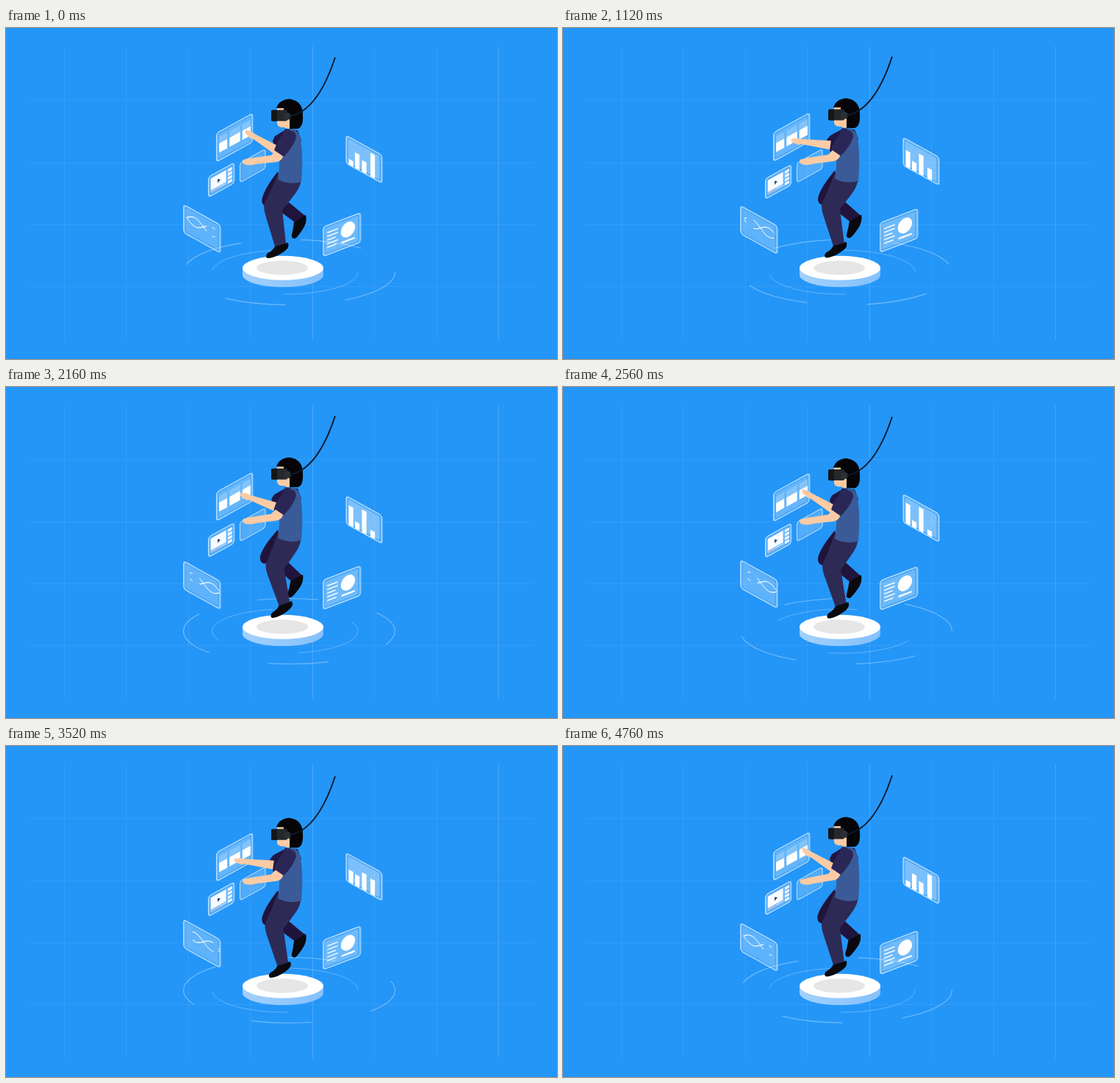
An HTML page for the animation above (4800 ms loop, 750 px wide and 450 px high).

```html
<!DOCTYPE html>
<html lang="en">
<head>
<meta charset="utf-8">
<title>Virtual reality</title>
<style>
  html, body { margin: 0; width: 100%; height: 100%; overflow: hidden; background: #2496f8; }
  svg { display: block; width: 750px; height: 450px; }
  .glass { fill: #fff; fill-opacity: .17; stroke: #fff; stroke-opacity: .62; stroke-width: 1.2; }
  .edge { fill: none; stroke: #fff; stroke-opacity: .35; stroke-width: 1; }
  .pale { fill: #fff; }
  .white { fill: #fff; }
  .skin { fill: #fccba4; }
  .line { fill: none; stroke: #fff; }
</style>
</head>
<body>
<svg viewBox="0 0 750 450" xmlns="http://www.w3.org/2000/svg">
  <defs>
    <linearGradient id="rim"><stop stop-color="#a2d1fc"/><stop offset="1" stop-color="#84c0fb"/></linearGradient>
    <clipPath id="tableClip"><rect x="3.5" y="4" width="43" height="31"/></clipPath>
  </defs>
  <rect width="750" height="450" fill="#2496f8"/>
  <g id="grid" stroke="#fff"></g>

  <ellipse id="outer" class="line" cx="385.5" cy="332" rx="144" ry="44.5" stroke-opacity=".34" stroke-width="1.2" stroke-dasharray="82"/>
  <ellipse id="inner" class="line" cx="379.7" cy="332" rx="99.2" ry="30" stroke-opacity=".28" stroke-dasharray="110"/>

  <path d="M322 326V335.8A55 16.5 0 0 0 432 335.8V326Z" fill="url(#rim)"/>
  <ellipse class="white" cx="377" cy="326.3" rx="55" ry="16.5"/>
  <ellipse cx="376" cy="326" rx="35" ry="9.7" fill="#e6e6e6"/>

  <g id="table"><g clip-path="url(#tableClip)"><g id="strip"></g></g></g>
  <g id="video">
    <rect class="white" x="3.2" y="4" width="20.8" height="16" opacity=".95"/>
    <path d="M12.5 9.5L16.5 12.5L12.5 15Z" fill="#2a4a80"/>
    <path class="line" d="M3.2 21.8H24" stroke-opacity=".7"/>
    <path d="M3.2 21.8H15" stroke="#e9a3b5"/>
    <path class="line" d="M26.5 6H32.5M26.5 11.3H32.5M26.5 16.6H32.5M26.5 21.9H32.5" stroke-width="3.4" stroke-opacity=".9"/>
  </g>
  <g id="blank"></g>
  <g id="waves"><g id="curves" class="line" stroke-width="1.2" stroke-opacity=".85" stroke-dasharray="32 8 4 10"></g></g>
  <g id="chart"><g id="bars" class="white"></g></g>
  <g id="profile">
    <path class="line" d="M5.5 10H20M5.5 15H20M5.5 20H17M5.5 25H20M5.5 30H18" stroke-width="1.7" stroke-opacity=".9"/>
    <ellipse class="white" cx="33.8" cy="16.3" rx="9.7" ry="10.2"/>
    <path class="line" d="M25 31H43" stroke-width="2.4"/>
  </g>

  <g id="person">
    <g id="farLeg">
      <path d="M370 195Q352 218 348.5 232Q347 241 355 243L378 226Z" fill="#20143c"/>
      <path d="M376 244L385 237L408 256L397 267L374 250Z" fill="#20143c"/>
      <path d="M392 264L408 254Q410 262 406 270Q399 282 394 286Q388 287 389 281Q391 274 392 264Z" fill="#0a0a0e"/>
    </g>
    <g id="nearLeg">
      <path d="M367 294L384 292Q387 299 377 305Q365 313 356 313Q352 311 356 306Q365 302 367 294Z" fill="#0a0a0e"/>
      <path d="M370 198Q361 221 352 238Q350 244 353 254L366 297L381 293L376 247Q383 239 390 230Q402 216 402 203Z" fill="#2d2a56"/>
    </g>
    <path id="farSleeve" fill="#211744"/>
    <path d="M380 137L397 139L402 152L396 165L372 165Q372 150 380 137Z" fill="#2a2757"/>
    <path d="M386 137Q397 137 401 149Q405 177 402 209Q386 214 370 206Q373 188 372 170Q380 150 390 144Z" fill="#3a5b97"/>
    <path id="farArm" class="skin"/>
    <path id="nearArm" class="skin" d="M367 167L378 171Q377 180 369 182L341 185Q330 188 324 185Q320 181 323 179L333 177L361 173Z"/>
    <path d="M381 141Q395 137 395 149Q391 162 378 175L365 166Q370 150 381 141Z" fill="#2a2757"/>

    <path class="skin" d="M369 109H388V136Q381 138 379 135Q370 136 369 130Z"/>
    <path d="M368 109Q372 97 386 96.5Q404 99 404 118Q405 135 397 137H386V124L378 115V109Z" fill="#050507"/>
    <rect x="361" y="111.5" width="22" height="15" rx="2" fill="#25282b"/>
    <path d="M361 112.5Q366 111 369 112V126.5Q364 127 361 126Z" fill="#141618"/>
    <circle cx="383" cy="120" r="5" fill="#2c3034"/>
    <path d="M386 120Q424 113 448 40" fill="none" stroke="#0e1a2c" stroke-width="1.9"/>
  </g>
</svg>
<script>
const $ = id => document.getElementById(id);
const LOOP = 4800, SPAN = 4760, TAU = Math.PI * 2;
const mix = (a, b, k) => a + (b - a) * k;

function add(parent, tag, attrs, first) {
  const el = document.createElementNS('http://www.w3.org/2000/svg', tag);
  for (const name in attrs) el.setAttribute(name, attrs[name]);
  parent.insertBefore(el, first ? parent.firstChild : null);
  return el;
}
const put = (id, value, name = 'transform') => $(id).setAttribute(name, value);

function smooth(a, b, x) {
  const k = Math.min(1, Math.max(0, (x - a) / (b - a)));
  return k * k * (3 - 2 * k);
}

// Drift values at a few moments, eased from one to the next.
const moments = [0, 720, 1520, 2160, 3000, 4160, SPAN];
function drift(values, t) {
  let i = 0;
  while (i < 5 && t >= moments[i + 1]) i++;
  return mix(values[i], values[i + 1], smooth(moments[i], moments[i + 1], t));
}

// Skewed glass panels; dx, dy place the second edge, tint fills the screen.
const panels = {
  table:   { x: 286.5, y: 143, w: 48.5, h: 39, skew: -.55, dx: 1, dy: 0, tint: .15, bob: [0, -2, .5, 0, 2, 2, 1] },
  video:   { x: 275.5, y: 202.5, w: 34.5, h: 27.5, skew: -.55, dx: 1, dy: 0, tint: .22, bob: [0, 3.5, 1.5, 1.5, 2.5, .5, 0] },
  blank:   { x: 318.5, y: 183.5, w: 34.5, h: 26.5, skew: -.55, dx: 0, dy: 0, tint: .05, bob: [0, 0, 0, 0, 0, 0, 0] },
  waves:   { x: 241.7, y: 240, w: 49.5, h: 38, skew: .55, dx: 1, dy: .6, tint: .12, bob: [0, 3.5, -.5, -3.5, -6.5, -1, .5] },
  chart:   { x: 463, y: 146, w: 48.3, h: 38, skew: .55, dx: 1, dy: .4, tint: .28, bob: [0, 4, 1.5, 2, -3, 2.5, 4] },
  profile: { x: 431.7, y: 270.5, w: 50.3, h: 40, skew: -.38, dx: 1.3, dy: 0, tint: .2, bob: [0, -6, -5, -8, -6, -7, 0] }
};
for (const id in panels) {
  const p = panels[id], g = $(id), size = { width: p.w, height: p.h, rx: 3.5 };
  add(g, 'rect', { x: 2.8, y: 2.8, width: p.w - 5.6, height: p.h - 5.6, rx: 2, class: 'pale', opacity: p.tint }, true);
  add(g, 'rect', { ...size, class: 'glass' }, true);
  if (p.dx) add(g, 'rect', { ...size, x: p.dx, y: p.dy, class: 'edge' }, true);
}

const pixel = v => Math.floor(v) + .5;
for (let i = 0; i < 8; i++)
  add($('grid'), 'path', { d: `M${pixel(79.5 + i * 84.45)} 25V424`, opacity: i == 4 || i == 7 ? .16 : .07 });
for (let i = 0; i < 4; i++)
  add($('grid'), 'path', { d: `M32 ${pixel(98.7 + i * 84.4)}H718`, opacity: .07 });

for (let i = 0; i < 4; i++) {
  const x = i * 17.5;
  add($('strip'), 'rect', { x, y: 7, width: 14.5, height: 9, class: 'pale', opacity: .2 });
  add($('strip'), 'rect', { x, y: 16, width: 14.5, height: 12.5, class: 'white' });
}

// Two mirrored waves that cross every 23 units.
for (const sign of [-1, 1]) {
  let d = '';
  for (let x = 4; x <= 49; x++)
    d += `${d ? 'L' : 'M'}${x} ${(15.5 + sign * 6 * Math.sin(Math.PI * (x - 4) / 23)).toFixed(2)}`;
  add($('curves'), 'path', { d });
}

const barX = [3.5, 12, 21.5, 33], low = [7.5, 21, 15.5, 32], high = [30.5, 7, 34, 4.5], base = 37.3;
const bars = barX.map(x => add($('bars'), 'rect', { x, width: 6.2 }));

// Forearm with a tapered wrist and a pointed hand.
function forearm(ex, ey, hx, hy) {
  const len = Math.hypot(hx - ex, hy - ey), ux = (hx - ex) / len, uy = (hy - ey) / len;
  const at = (along, side) =>
    `${(ex + ux * along - uy * side).toFixed(2)} ${(ey + uy * along + ux * side).toFixed(2)}`;
  return `M${at(-3, 6)}L${at(len - 14, 3.2)}Q${at(len - 5, 4)} ${at(len, 1.5)}` +
    `Q${at(len + 2, -1)} ${at(len - 2, -3)}L${at(len - 10, -5)}L${at(len - 15, -3.8)}L${at(-3, -6)}Z`;
}

function draw(t) {
  const u = t / SPAN;
  put('outer', 492 * u, 'stroke-dashoffset');
  put('inner', -440 * u, 'stroke-dashoffset');

  for (const id in panels) {
    const p = panels[id];
    put(id, `matrix(1 ${p.skew} 0 1 ${p.x} ${(p.y + drift(p.bob, t)).toFixed(2)})`);
  }

  const pulse = (1 - Math.cos(TAU * 3 * u)) / 2;
  bars.forEach((bar, i) => {
    const h = mix(low[i], high[i], pulse);
    bar.setAttribute('y', base - h);
    bar.setAttribute('height', h);
  });
  put('curves', -24 * pulse, 'stroke-dashoffset');

  // The hand drags the columns left, then comes back alone.
  const phase = t % 2400 / 2400;
  const swipe = smooth(.25, .35, phase), k = swipe - smooth(.82, .97, phase);
  put('strip', `translate(${.2 - 17.5 * swipe} 0)`);
  put('farArm', forearm(mix(365, 361, k), mix(164, 160, k), mix(326, 311, k), mix(140, 153.5, k)), 'd');
  put('farSleeve', `M381 138L${366 - 2 * k} 147L${363 - 4 * k} 153L${367 - 3 * k} 170L380 162Z`, 'd');

  const w = TAU * t / LOOP;
  const bob = -1.2 * Math.sin(w) + .5 * Math.sin(2 * w);
  put('person', `translate(0 ${bob.toFixed(2)})`);
  put('nearArm', `rotate(${-drift([0, 1, 1, 1, 0, 2.5, 3], t)} 374 170)`);
  put('nearLeg', `rotate(${-.57 * drift([0, 0, 4, 6, 4, 3, 2], t)} 385 205)`);
  put('farLeg', `rotate(${.76 * drift([0, 1, 4, 5, 0, 0, 4], t)} 380 195)`);
}

const start = performance.now();
function tick() {
  draw((performance.now() - start) % LOOP);
  requestAnimationFrame(tick);
}
tick();
</script>
</body>
</html>
```
